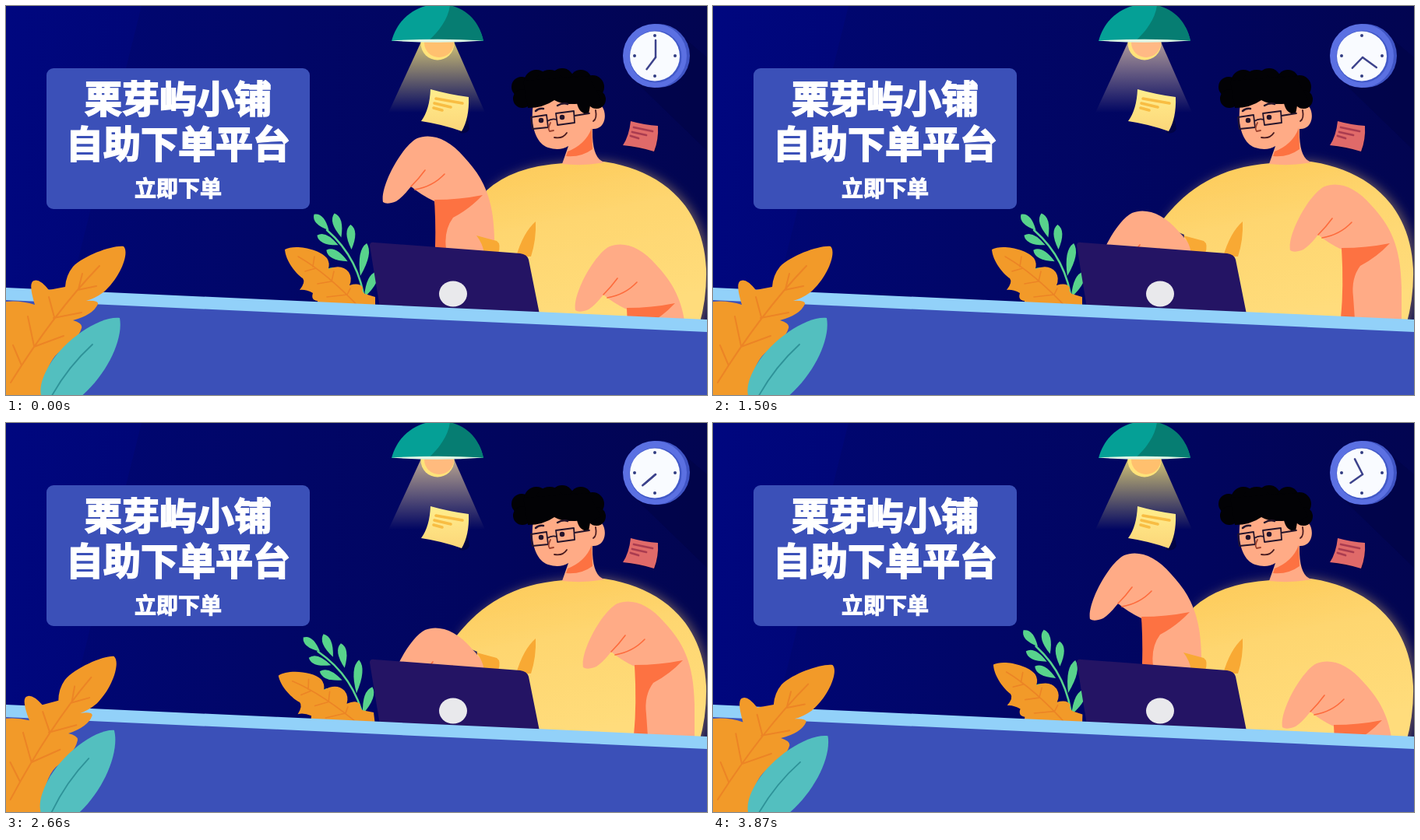
Write an HTML page that moves like this. It is 900 by 500 pixels and loops after 3.91 s.

```html
<!DOCTYPE html>
<html lang="zh">
<meta charset="utf-8">
<style>
html, body { margin: 0; width: 100%; height: 100%; overflow: hidden; background: #01045f }
svg { display: block; width: 900px; height: 500px }
text { font-family: "Noto Sans CJK SC", "Noto Sans CJK", sans-serif; font-weight: 900; fill: #fff; stroke: #fff; stroke-width: .04em; text-anchor: middle }
.line { fill: none; stroke-linecap: round; stroke-linejoin: round }
</style>
<svg viewBox="0 0 900 500">
  <defs>
    <linearGradient id="wall">
      <stop stop-color="#000676"/><stop offset=".4" stop-color="#010667"/>
      <stop offset=".7" stop-color="#01055e"/><stop offset="1" stop-color="#020551"/>
    </linearGradient>
    <linearGradient id="side" x2="1" y2=".25">
      <stop stop-color="#00077f"/><stop offset="1" stop-color="#000677"/>
    </linearGradient>
    <linearGradient id="beam" x2="0" y2="1">
      <stop id="beamTop" stop-color="#ffe98a"/>
      <stop id="beamEnd" offset="1" stop-color="#ffe98a" stop-opacity="0"/>
    </linearGradient>
    <linearGradient id="shirt" x2=".3" y2="1">
      <stop stop-color="#fdc957"/><stop offset=".45" stop-color="#fed670"/><stop offset="1" stop-color="#ffdc7b"/>
    </linearGradient>
    <linearGradient id="paper" x2="0" y2="1">
      <stop stop-color="#ffee8d"/><stop offset="1" stop-color="#fcd679"/>
    </linearGradient>
    <filter id="glow" x="-20%" y="-20%" width="140%" height="140%">
      <feDropShadow dx="4" dy="0" stdDeviation="7" flood-color="#ffd070" flood-opacity=".4"/>
    </filter>
    <g id="hand">
      <path fill="#ffab86" d="M484 252C480 232 508 180 528 170C545 163 568 170 588 194C612 220 626 245 627 300L627 345L549 341C553 300 554 270 550 251Q533 243 520 232Q509 246 501 251Q489 256 484 252Z"/>
      <path fill="#fd7242" d="M550 249Q582 249 612 243Q595 261 574 272Q562 288 565 312L567 341L549 340Q553 300 550 249Z"/>
      <path class="line" stroke="#fd6b3c" stroke-width="1.6" d="M520 232Q530 222 538 211M525 236Q548 232 563 216"/>
    </g>
  </defs>

  <rect width="900" height="500" fill="url(#wall)"/>
  <path fill="url(#side)" d="M0 0H174L74 400H0Z"/>
  <path fill="#010340" opacity=".45" d="M804 93L866 37L900 66V186Z"/>

  <path fill="url(#beam)" d="M533 46H575L615 137H491Z"/>
  <circle cx="554" cy="48" r="21.5" fill="#ffe37a"/>
  <circle id="bulb" cx="556" cy="47" r="19" fill="#ffb877"/>
  <path fill="#05a096" d="M495 45C503 15 528-2 554-2C584-2 607 17 613 45Z"/>
  <path fill="#067d72" d="M570-1C597 6 609 25 613 45H542C556 33 568 16 570-1Z"/>
  <path fill="#dff6e5" d="M495 44.500Q554 41 613 44.500Q554 49 495 44.500Z"/>

  <path fill="#010345" d="M590 130L595 158Q592 165 582 163Z"/>
  <path fill="url(#paper)" d="M545 107Q570 114 594 117Q595 144 585 161Q560 152 533 148Q544 133 545 107Z"/>
  <path class="line" stroke="#f8bd43" stroke-width="3.600" d="M552 119L586 125M550 125L571 130M549 131L560 134"/>
  <path fill="#010345" d="M796 181L834 187L838 165Z"/>
  <path fill="#e06a69" d="M802 148Q820 153 837 154Q838 172 832 187Q813 181 792 179Q800 167 802 148Z"/>
  <path class="line" stroke="#aa3c50" stroke-width="2.800" d="M806 156L830 161M804 162L822 166M802 167L812 170"/>

  <circle cx="837" cy="64" r="41" fill="#4055c5"/>
  <circle cx="833" cy="64" r="41" fill="#5b70e2"/>
  <circle cx="834" cy="65" r="33.500" fill="#4259c8"/>
  <circle cx="833" cy="64.500" r="32" fill="#f9fbff"/>
  <path class="line" stroke="#313c82" stroke-width="4" d="M833 38h0M833 90h0M807 64h0M859 64h0"/>
  <g class="line" stroke="#3d438c" stroke-width="2.500">
    <path id="minute" d="M834 66V44"/><path id="hour" d="M834 66V47"/>
  </g>

  <path id="body" fill="url(#shirt)" filter="url(#glow)"/>
  <use id="right" href="#hand"/>
  <use id="left" href="#hand"/>
  <path fill="#f8a934" d="M604 295L630 302Q636 306 632 318H614Q612 305 604 295ZM680 277Q664 291 655 322H674Q681 300 680 277Z"/>

  <path fill="#ffab86" d="M677 126C673 148 678 176 696 182Q711 187 722 180L714 203Q742 206 769 201Q752 197 753 158C766 159 771 146 768 135C765 124 755 123 750 128L735 112H690Z"/>
  <path fill="#fd7242" d="M752 157Q744 178 721 187L719 193Q738 195 753 184Z"/>
  <g id="hair" fill="#020205"></g>
  <path fill="#020205" d="M664 96L748 90L764 120L750 128L748 139Q736 139 733 125Q716 128 704 121Q690 131 670 131Z"/>
  <g class="line" stroke="#25152b" stroke-width="1.800">
    <path d="M674 143L694 140L696 156L676 158ZM706 138L729 135L730 150L708 153ZM695 148Q701 144 707 146M730 141L749 138"/>
    <path stroke-width="2.500" d="M680 135Q684 131 690 132M708 128Q715 124 721 126"/>
    <path stroke-width="6.500" d="M687 147h0M714 143h0"/>
    <path stroke="#9c432f" d="M699 150Q695 158 698 161L703 160"/>
    <path stroke="#4a1c20" d="M704 169Q715 171 720 163M757 134Q759 145 754 148"/>
  </g>

  <g id="plants">
    <g id="sprig" fill="#58d38c"><path class="line" stroke="#58d38c" stroke-width="2.500" d="M461 384C457 347 443 315 412 288"/></g>
    <path fill="#f29a29" d="M358 313C370 306 402 312 412 324Q416 330 414 338Q431 331 440 342Q445 350 441 359Q454 355 458 362Q456 370 464 371L474 374V400H398L400 379Q391 378 394 369Q385 364 377 365Q385 355 381 350C373 345 359 328 358 313Z"/>
    <path class="line" stroke="#ec8425" stroke-width="1.600" d="M375 322Q412 343 456 390M394 335L396 322M398 337L384 341M418 354L421 341M418 354L400 357M438 371L442 363M438 371L412 374"/>
  </g>

  <path fill="#241464" d="M467 308Q467 303 473 304L660 318Q669 319 671 326L685 396L480 388Z"/>
  <ellipse cx="574" cy="370" rx="18" ry="16.500" fill="#e9e9ec"/>
  <path fill="#3b50b8" d="M0 370L900 411V500H0Z"/>
  <path fill="#92d1f9" d="M0 362L900 403V419L0 378Z"/>

  <g id="big">
    <path fill="#f29a29" d="M-20 384Q10 375 37 384Q28 355 36 353Q43 350 55 365L76 361Q77 346 86 335C101 320 138 307 151 309C159 317 147 349 125 368Q114 376 103 379Q119 378 118 383Q112 397 86 404Q99 408 97 414Q92 431 67 446Q48 462 43 520H-20Z"/>
    <path class="line" stroke="#ec8425" stroke-width="2" d="M120 334Q62 394 6 484M93 364L98 344M92 365L116 360M62 400L55 374M61 401L97 394M36 437L28 399M36 438L74 424M20 462L9 436"/>
  </g>
  <g id="teal">
    <path fill="#53bfbf" d="M146 401C121 398 76 428 56 461C43 483 39 502 54 515H78C121 490 152 433 146 401Z"/>
    <path class="line" stroke="#2e9298" stroke-width="1.800" d="M111 435Q77 466 55 508"/>
  </g>

  <rect x="52" y="80" width="338" height="181" rx="9" fill="#3b50b8"/>
  <text x="221" y="137" font-size="48">栗芽屿小铺</text>
  <text x="221" y="195" font-size="48">自助下单平台</text>
  <text x="221" y="245" font-size="28">立即下单</text>
</svg>
<script>
const el = id => document.getElementById(id);
const set = (id, name, value) => el(id).setAttribute(name, value);
const turn = (id, angle, x, y) => set(id, 'transform', `rotate(${angle} ${x} ${y})`);
const wave = (step, peak, period) => Math.cos(2 * Math.PI * (step - peak) / period);

// The scene advances in 75 steps, shown on a display grid of 94 ticks per loop.
const LOOP = 3910, STEPS = 75, TICKS = 94;
const swayAt = step => wave(step, 33.5, 39);

const RIGHT_SIDE = 'C836 208 895 252 899 338Q900 375 890 410H605';
const BODY = {
  up: 'M760 199' + RIGHT_SIDE + 'L600 320Q612 270 617 237Q651 206 716 202Z',
  down: 'M760 199' + RIGHT_SIDE + 'V294Q590 289 578 274C610 234 650 207 716 202Z'
};

// x, y, radius of each curl
el('hair').innerHTML = [[662, 104, 13], [681, 98, 16], [714, 95, 15], [738, 96, 14], [753, 104, 15],
  [758, 120, 12], [663, 119, 12], [698, 100, 18], [730, 108, 18]]
  .map(([x, y, r]) => `<circle cx="${x}" cy="${y}" r="${r}"/>`).join('');

// x, y, angle, length of each leaf
el('sprig').innerHTML += [[405, 278, 47, 28], [426, 282, 74, 32], [443, 297, 88, 32], [413, 301, 25, 30],
  [425, 321, 28, 31], [459, 326, 101, 43], [427, 345, 29, 31], [468, 358, 116, 37]]
  .map(([x, y, a, length]) => `<path transform="translate(${x} ${y}) rotate(${a})"
    d="M${-length / 2} 0Q${-length / 4} -11 ${length / 2} 0Q${-length / 4} 11 ${-length / 2} 0Z"/>`).join('');

function draw(step) {
  const sway = swayAt(step) - swayAt(0);
  turn('plants', 4.2 * sway, 455, 390);
  turn('big', 2.4 * sway, 8, 490);
  turn('teal', 2.4 * sway, 50, 505);
  turn('minute', step * 4.5, 834, 66);
  turn('hour', 217 + step * .24, 834, 66);

  const raised = step % 6 < 3;
  set('body', 'd', raised ? BODY.up : BODY.down);
  set('left', 'transform', raised ? 'translate(0 0)' : 'translate(10 96)');
  set('right', 'transform', raised ? 'translate(247 139)' : 'translate(257 62)');

  const warm = .5 + .5 * wave(step, -4, 78);
  const tint = `rgb(255 ${220 + 15 * warm} ${185 - 65 * warm})`;
  set('beamTop', 'stop-color', tint);
  set('beamEnd', 'stop-color', tint);
  set('beamTop', 'stop-opacity', .68 + .15 * warm);
  set('bulb', 'fill', `rgb(255 ${184 + 8 * warm} ${135 - 25 * warm})`);
}

function tick(now) {
  const shown = Math.floor(now % LOOP / LOOP * TICKS + .1);
  draw(Math.floor(shown * STEPS / TICKS) % STEPS);
  requestAnimationFrame(tick);
}
draw(0);
requestAnimationFrame(tick);
</script>
</html>
```
